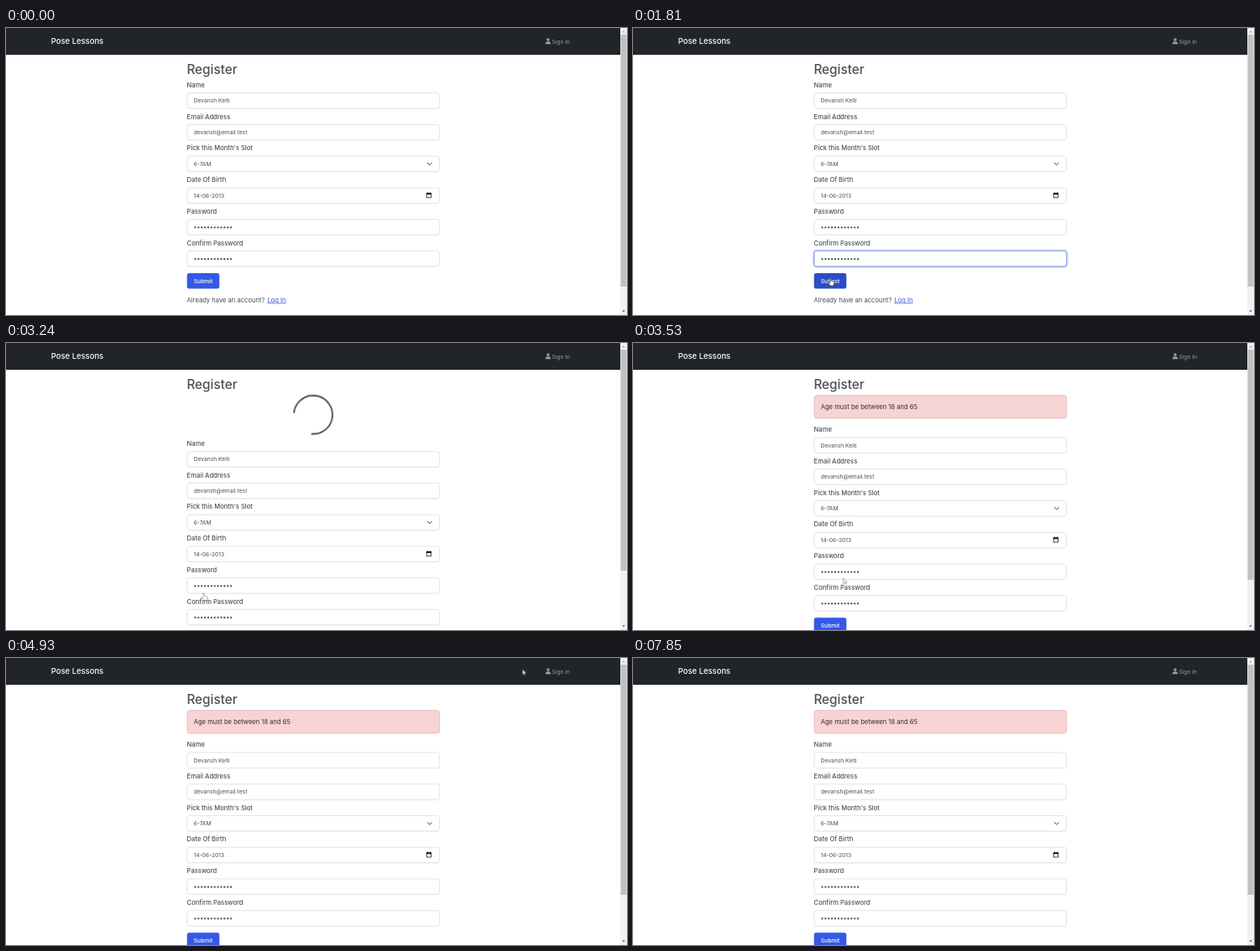
Animation, 740 px wide and 343 px high, one loop 8.16 s. Source, as an HTML page:

```html
<!DOCTYPE html>
<html lang="en">
<head>
<meta charset="utf-8">
<title>Register</title>
<style>
  html, body { margin: 0; width: 100%; height: 100%; overflow: hidden; background: #fff; }
  svg { display: block; }
  text { font: 400 6.7px Inter, Arial, sans-serif; fill: #495057; }
  .label { font-size: 7.6px; font-weight: 500; }
  .body { font-size: 7.6px; }
  .title { font-size: 15.3px; font-weight: 500; }
  .brand { font-size: 9.45px; font-weight: 500; fill: #fff; }
  .box { fill: #fff; stroke: #dfe3e7; stroke-width: .9; }
  .shade { stroke: #000; stroke-opacity: .05; }
  .dots { stroke: #495057; stroke-width: 2.3; stroke-linecap: round; stroke-dasharray: 0 3.87; }
  .icon { fill: none; stroke: #343a40; stroke-width: 1; stroke-linecap: round; stroke-linejoin: round; }
  .pointer { fill: #fff; stroke: #222; stroke-width: .6; stroke-linejoin: round; }

  #form, #thumb, #focus, #alert, #wait, #button, #arrow, #hand { animation: 8160ms step-end infinite; }
  #form { animation-name: shift; }
  #thumb { animation-name: thumb; }
  #focus { animation-name: focus; }
  #alert { animation-name: alert; }
  #wait { animation-name: wait; }
  #button { animation-name: button; }
  #arrow { animation-name: arrow; }
  #hand { animation-name: hand; }
  #ring { transform-origin: 366px 86px; animation: spin 8160ms infinite; }
  #cursor { animation: move 8160ms infinite; }

  @keyframes shift {
    0% { transform: translateY(0); }
    36% { transform: translateY(52px); }
    41.97%, 100% { transform: translateY(35.3px); }
  }
  @keyframes thumb {
    0% { height: 301px; }
    36% { height: 264px; }
    41.97%, 100% { height: 275px; }
  }
  @keyframes focus {
    0% { opacity: 0; }
    8.4% { opacity: 1; }
    34.8%, 100% { opacity: 0; }
  }
  @keyframes alert { 0% { opacity: 0; } 41.97%, 100% { opacity: 1; } }
  @keyframes wait {
    0% { opacity: 0; }
    36% { opacity: 1; }
    41.97%, 100% { opacity: 0; }
  }
  @keyframes spin {
    0% { transform: rotate(45deg); }
    36% { transform: rotate(45deg); animation-timing-function: steps(5); }
    41.97%, 100% { transform: rotate(279deg); }
  }
  @keyframes button {
    0% { fill: #3459e6; }
    18.4% { fill: #2c4cc4; }
    34.8% { fill: #2947b8; }
    36%, 100% { fill: #3459e6; }
  }
  @keyframes arrow {
    0% { opacity: 0; }
    2.69% { opacity: 1; }
    17.2% { opacity: 0; }
    41.97% { opacity: .6; }
    44.6% { opacity: 1; }
    96.13%, 100% { opacity: 0; }
  }
  @keyframes hand {
    0% { opacity: 0; }
    17.2% { opacity: 1; }
    36% { opacity: .55; }
    41.97%, 100% { opacity: 0; }
  }
  @keyframes move {
    0% { transform: translate(330px, 343px); animation-timing-function: step-end; }
    1.5% { transform: translate(330px, 343px); animation-timing-function: steps(6); }
    8.4% { transform: translate(270px, 276px); animation-timing-function: step-end; }
    12.4% { transform: translate(270px, 276px); animation-timing-function: steps(5); }
    18.55% { transform: translate(235.5px, 298.5px); animation-timing-function: step-end; }
    41.97% { transform: translate(241px, 293px); animation-timing-function: step-end; }
    43.13% { transform: translate(250.5px, 281px); animation-timing-function: step-end; }
    44.5% { transform: translate(264px, 264px); animation-timing-function: step-end; }
    45.65% { transform: translate(272px, 254px); animation-timing-function: step-end; }
    49.4% { transform: translate(272px, 254px); animation-timing-function: steps(9); }
    60.35% { transform: translate(615.5px, 13.5px); animation-timing-function: step-end; }
    61.58% { transform: translate(618px, 13px); animation-timing-function: step-end; }
    62.95% { transform: translate(618px, 13px); animation-timing-function: steps(7); }
    71.5%, 100% { transform: translate(646px, 0); }
  }
</style>
</head>
<body>
<svg width="740" height="343" viewBox="0 0 740 343">
  <defs>
    <g id="field">
      <rect class="shade" x="216" y="78.3" width="300.6" height="18.4" rx="3" fill="none"/>
      <rect class="box" x="216" y="77.7" width="300.6" height="18.4" rx="3"/>
    </g>
    <path id="mask" class="dots" d="M225.5 87.4h43"/>
  </defs>
  <rect width="740" height="343" fill="#fff"/>

  <g id="form">
    <g>
      <use href="#field"/>
      <text class="label" x="215.6" y="70.9">Name</text>
      <text x="223.7" y="89.3">Devansh Kelti</text>
    </g>
    <g transform="translate(0 37.75)">
      <use href="#field"/>
      <text class="label" x="215.6" y="70.9">Email Address</text>
      <text x="223.7" y="89.3">devansh@email.test</text>
    </g>
    <g transform="translate(0 75.5)">
      <use href="#field"/>
      <text class="label" x="215.6" y="70.9">Pick this Month's Slot</text>
      <text x="223.7" y="89.3">6-7AM</text>
      <path class="icon" d="M502.2 85.8l2.5 2.4 2.5-2.4"/>
    </g>
    <g transform="translate(0 113.25)">
      <use href="#field"/>
      <text class="label" x="215.6" y="70.9">Date Of Birth</text>
      <text x="223.7" y="89.3">14-06-2013</text>
      <path d="M501.2 84.3h5.4v5.2h-5.4z" fill="none" stroke="#111" stroke-width=".8"/>
      <path d="M500.9 83.9h6v1.8h-6zM502 83h.8v1h-.8zM505 83h.8v1h-.8z" fill="#111"/>
    </g>
    <g transform="translate(0 151)">
      <use href="#field"/>
      <text class="label" x="215.6" y="70.9">Password</text>
      <use href="#mask"/>
    </g>
    <g transform="translate(0 188.75)">
      <use href="#field"/>
      <text class="label" x="215.6" y="70.9">Confirm Password</text>
      <g id="focus" fill="none">
        <rect x="215.2" y="76.9" width="302.2" height="20" rx="3.6" stroke="#3459e6" stroke-opacity=".28" stroke-width="2"/>
        <rect x="216" y="77.7" width="300.6" height="18.4" rx="3" stroke="#8fa4f0" stroke-width=".9"/>
      </g>
      <use href="#mask"/>
    </g>
    <rect id="button" x="215.7" y="293" width="38.6" height="18.6" rx="2.8"/>
    <text x="235" y="304.6" text-anchor="middle" style="fill:#fff;font-weight:500">Submit</text>
    <text class="body" x="215.6" y="327.6">Already have an account?</text>
    <text class="body" x="311.4" y="327.6" style="fill:#3459e6;text-decoration:underline">Log In</text>
  </g>

  <text class="title" x="215.4" y="54.6">Register</text>
  <g id="wait">
    <circle id="ring" cx="366" cy="86.2" r="23" fill="none" stroke="#495057" stroke-width="1.9" pathLength="4" stroke-dasharray="3 1"/>
  </g>
  <g id="alert">
    <rect x="216" y="62.7" width="300.6" height="27.2" rx="3" fill="#f7d4d4" stroke="#efb5b7" stroke-width=".9"/>
    <text class="body" x="223.7" y="79" style="fill:#3b2c2d">Age must be between 18 and 65</text>
  </g>

  <rect width="732" height="32" fill="#212529"/>
  <text class="brand" x="53.8" y="19.4">Pose Lessons</text>
  <g fill="#9b9d9f">
    <circle cx="646" cy="14" r="1.8"/>
    <path d="M642.8 19.3c0-2 1-3 2.2-3h2c1.200 0 2.200 1 2.200 3z"/>
  </g>
  <text x="650.4" y="18.5" style="fill:#9b9d9f">Sign In</text>

  <rect x="732" width="8" height="343" fill="#f1f1f1"/>
  <rect id="thumb" x="732.5" y="8" width="7" height="301" fill="#c1c1c1"/>
  <path d="M734.300 5.300l1.700-2 1.700 2z" fill="#a3a3a3"/>
  <path d="M734.300 337.500l1.700 2 1.700-2z" fill="#505050"/>

  <g id="cursor">
    <path id="arrow" class="pointer" d="M0 0v6.600l1.500-1.300 1 2.200 1.100-.5-1-2.100h2z"/>
    <path id="hand" class="pointer" d="M-.7.6q.7-1.200 1.400 0v3l3 .8q.8.300.7 1.200l-.6 2.700-.6 1.200h-3.600l-2.300-3.300q-.2-1 .9-.7l1.100.9z"/>
  </g>
</svg>
</body>
</html>
```
